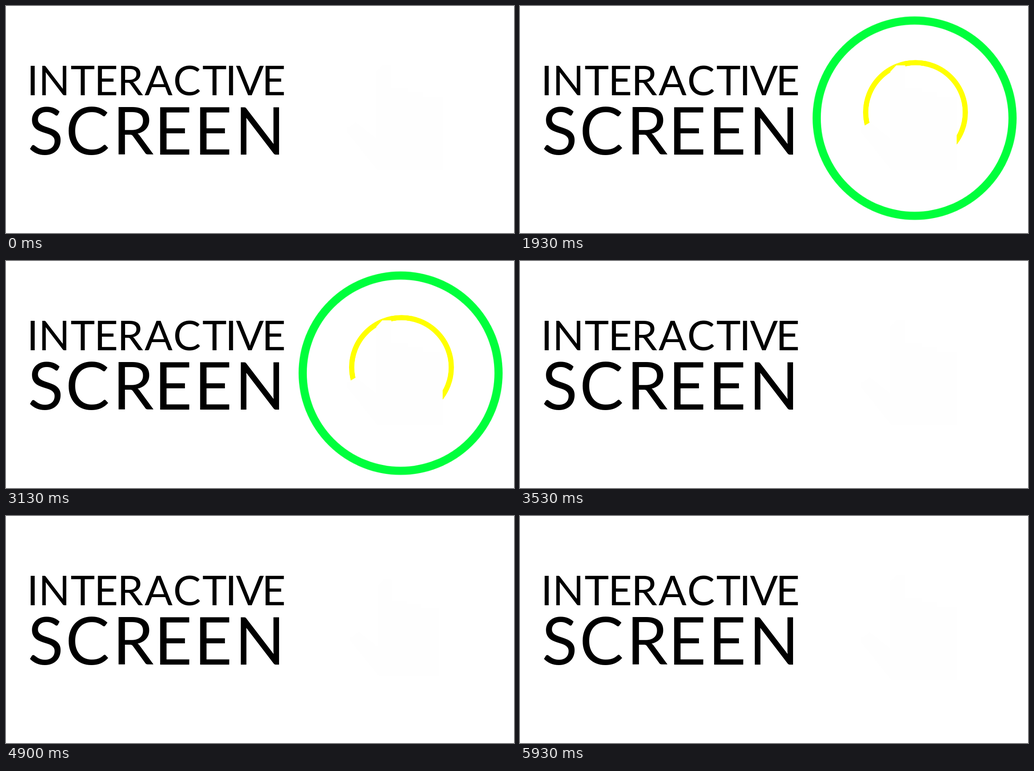
Recreate the animation shown at these times as an HTML page without scripts. Size 1118 by 501 pixels, loop 6.01 s.

```html
<!DOCTYPE html>
<html lang="en">
<head>
<meta charset="utf-8">
<title>Interactive screen</title>
<style>
  html, body { margin: 0; height: 100%; overflow: hidden; background: #fff; }
  svg { display: block; width: 100%; height: 100%; }
  text { font-family: Lato, "Open Sans", sans-serif; fill: #000; }

  /* five taps make one 6010 ms loop */
  .ring, .hand, .rings { animation: 1202ms step-end infinite; }
  .ring { fill: none; stroke-width: 20; transform-origin: 872.3px 221.5px; }
  .outer { stroke: #00ff3c; animation-name: outer; }
  .inner { stroke: #ff0; animation-name: inner; }
  .rings { animation-name: fade; }
  .hand { fill: #fefefe; transform-origin: 857px 250px; animation-name: press; }

  @keyframes outer {
    0% { transform: scale(0); }
    35.1% { transform: scale(.044); }
    40.9% { transform: scale(.175); }
    49.2% { transform: scale(.474); }
    55% { transform: scale(.708); }
    60% { transform: scale(.898); }
    65.8% { transform: scale(.975); }
    74.1% { transform: scale(1); }
    93.2%, 100% { transform: scale(0); }
  }
  @keyframes inner {
    0% { transform: scale(0); }
    49.2% { transform: scale(.175); }
    55% { transform: scale(.38); }
    60% { transform: scale(.577); }
    65.8% { transform: scale(.8); }
    74.1% { transform: scale(.9525); }
    80% { transform: scale(1); }
    93.2%, 100% { transform: scale(0); }
  }
  @keyframes fade {
    0% { opacity: 1; }
    88.3% { opacity: .5; }
    93.2%, 100% { opacity: 1; }
  }
  @keyframes press {
    0% { transform: scale(1); }
    7.6% { transform: scale(.92); }
    13.4% { transform: scale(.87); }
    21.7% { transform: scale(.85); }
    35.1% { transform: scale(.88); }
    40.9% { transform: scale(.93); }
    49.2% { transform: scale(.98); }
    55%, 100% { transform: scale(1); }
  }
</style>
</head>
<body>
<svg viewBox="0 0 1118 501">
  <text y="197" font-size="91" x="46 71.5 142 194 245 305 368 432 482.5 506 563">INTERACTIVE</text>
  <text y="328" font-size="145" x="48 131 234.5 326 414 503.5">SCREEN</text>
  <g class="rings">
    <circle class="ring outer" cx="868" cy="250.5" r="240"/>
    <circle class="ring inner" cx="869" cy="244.2" r="190"/>
  </g>
  <path class="hand" d="M815 145L828 131H848V181H884V190H918V200H961V363H818L750 278V269L770 257L815 292Z"/>
</svg>
</body>
</html>
```
